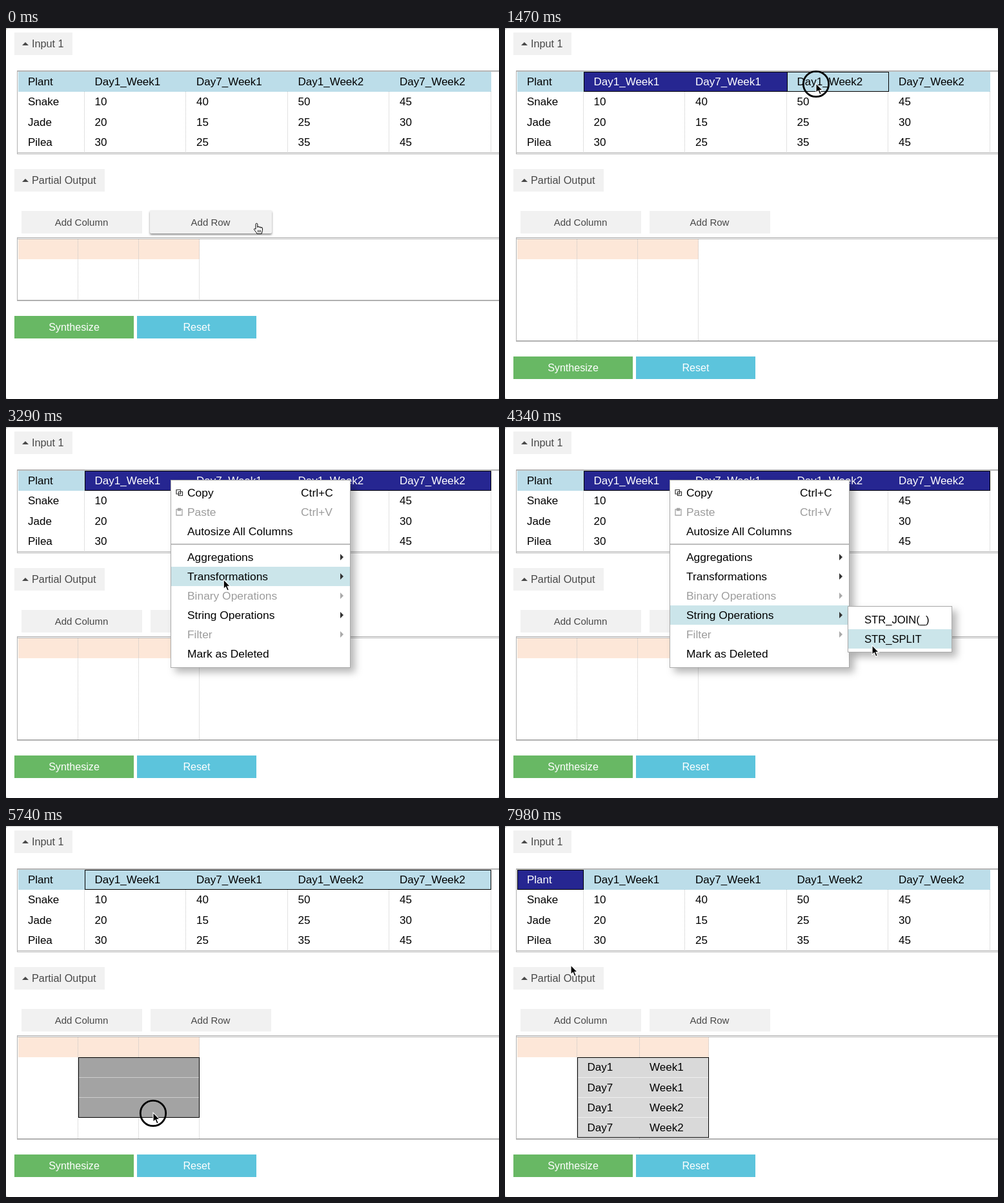
These frames come from a looping animation (764x576 px, 8000 ms). An HTML page:

```html
<!DOCTYPE html>
<html lang="en">
<head>
<meta charset="utf-8">
<title>Table synthesis</title>
<style>
html, body { margin: 0; width: 100%; height: 100%; overflow: hidden; background: #fff; }
svg { display: block; width: 764px; height: 576px; font: 17px "Liberation Sans", Arial, sans-serif; cursor: default; }
.menu { font-size: 17.4px; }
.sub { font-size: 16.6px; }
.raised { filter: drop-shadow(0 2px 1.5px rgba(0,0,0,.45)); }
.float { filter: drop-shadow(7px 7px 6px rgba(0,0,0,.28)); }
</style>
</head>
<body>
<svg id="stage" viewBox="0 0 764 576"></svg>
<script>
const LOOP = 8000, STEP = 70;

// Pointer tip: time, x, y
const PATH = [
  [0, 388, 304], [630, 388, 304], [1120, 165, 85], [1190, 165, 85],
  [1470, 482, 86], [1820, 738, 84], [2030, 738, 84], [2520, 259, 82],
  [2660, 255, 81], [2870, 255, 81], [3430, 365, 289], [3710, 368, 291],
  [3850, 380, 292], [4060, 543, 298], [4270, 569, 339], [4620, 569, 339],
  [5180, 140, 374], [5390, 140, 374], [5740, 228, 445], [6020, 252, 468],
  [6300, 252, 468], [6580, 199, 370], [7140, 73, 86], [7490, 73, 86],
  [7980, 102, 216], [8000, 102, 216]
];
// Intervals with a mouse button held
const PRESS = [[210, 350], [420, 560], [1190, 1960], [4410, 4550], [5250, 6160], [7210, 7490]];

const T = {
  row1: 280, row2: 490, select: 1190, menu: 2870, sub: 3850, shut: 4550,
  mark: 5250, paste: 6300, blur: 7350, plant: 7490
};

const HEAD = ["Plant", "Day1_Week1", "Day7_Week1", "Day1_Week2", "Day7_Week2"];
const DATA = [["Snake", 10, 40, 50, 45], ["Jade", 20, 15, 25, 30], ["Pilea", 30, 25, 35, 45]];
const EDGE = [19, 122, 279.5, 437, 594.5, 752];
const ROW = 31.25, TOP = 359;
const NAVY = "#262691", SKY = "#bcdde9", INK = "#000";

const MENU = [
  [102, "Copy"], [132, "Paste", 1], [162, "Autosize All Columns"],
  [202, "Aggregations"], [232, "Transformations"], [262, "Binary Operations", 1],
  [292, "String Operations"], [322, "Filter", 1], [352, "Mark as Deleted"]
];
const SUB = [[299, "STR_JOIN(_)"], [329, "STR_SPLIT"]];

const rect = (x, y, w, h, fill, more = "") =>
  `<rect x="${x}" y="${y}" width="${w}" height="${h}" fill="${fill}" ${more}/>`;
const frame = (x, y, w, h, color = INK) =>
  rect(x + .5, y + .5, w - 1, h - 1, "none", `stroke="${color}"`);
const text = (x, y, s, fill = INK, more = "") =>
  `<text x="${x}" y="${y}" fill="${fill}" ${more}>${s}</text>`;
const path = (d, fill, more = "") => `<path d="${d}" fill="${fill}" ${more}/>`;
const dots = (x, y, end) => path(`M${Math.floor(x) + .5} ${y}V${end}`, "none",
  `stroke="#c4c4c4" stroke-dasharray="1 1"`);
const within = (p, x, y, w, h) => p.x >= x && p.x < x + w && p.y >= y && p.y < y + h;
const clamp = (v, lo, hi) => Math.max(lo, Math.min(hi, v));

// Smooth curve through the path points, at rest wherever a point repeats
function slope(i, k) {
  const a = PATH[i - 1], b = PATH[i], c = PATH[i + 1];
  if (!a || !c) return 0;
  const d1 = b[k] - a[k], d2 = c[k] - b[k];
  return d1 * d2 <= 0 ? 0 : (c[k] - a[k]) / (c[0] - a[0]);
}
function pointer(t) {
  let i = 0;
  while (i < PATH.length - 2 && t >= PATH[i + 1][0]) i++;
  const a = PATH[i], b = PATH[i + 1], d = b[0] - a[0], u = (t - a[0]) / d;
  const at = k => {
    const s = u * u * (3 - 2 * u);
    return a[k] + (b[k] - a[k]) * s
      + d * u * (1 - u) * ((1 - u) * slope(i, k) - u * slope(i + 1, k));
  };
  return { x: at(1), y: at(2) };
}

function button(p, x, y, w, label, size, toggle) {
  const hot = p && within(p, x, y, w, 35);
  const box = hot ? rect(x - 1, y - 1, w + 2, 36, "#f1f1f1", `rx="2" class="raised"`)
                  : rect(x, y, w, 35, "#f1f1f1");
  const ink = "#484848";
  return box + (toggle
    ? path(`M${x + 12} ${y + 20}l5-5 5 5z`, ink) + text(x + 27, y + 23, label, ink, `font-size="${size}"`)
    : text(x + w / 2 - .5, y + 23, label, ink, `font-size="${size}" text-anchor="middle"`));
}

function headerRange(t) {
  const col = time => {
    const x = pointer(Math.min(time, 1820)).x;
    return clamp(EDGE.findIndex(e => e > x) - 1, 1, 4);
  };
  if (t < T.select || (t >= T.blur && t < T.plant)) return null;
  if (t >= T.plant) return { from: 0, to: 0, fill: 0 };
  return { from: 1, to: col(t), fill: t < T.mark ? col(t - STEP) : -1 };
}

function inputTable(t) {
  const range = headerRange(t);
  let s = rect(17, 66, 747, 1, "#a2a2a2") + rect(17, 67, 747, 1, "#c6c6c6")
    + rect(17, 66, 1, 130, "#b0b0b0")
    + rect(17, 193, 747, 1, "#b4b4b4") + rect(17, 195, 747, 1, "#b4b4b4")
    + rect(19, 68, 733, 31, SKY);
  if (range) {
    const x = EDGE[range.from];
    if (range.fill >= range.from) s += rect(x, 68, EDGE[range.fill + 1] - x, 31, NAVY);
    s += frame(Math.floor(x), 68, Math.ceil(EDGE[range.to + 1]) - Math.floor(x), 31);
    if (range.fill >= 0 && range.fill < range.to)
      s += frame(Math.floor(EDGE[range.to]), 68, 158, 31);
  }
  HEAD.forEach((name, c) => {
    const x = EDGE[c] + (c ? 15.5 : 15);
    const lit = range && c >= range.from && c <= range.fill;
    s += text(x, 89, name, lit ? "#fff" : INK) + dots(EDGE[c + 1] - 1, 99, 192);
    DATA.forEach((row, r) => s += text(x, 120 + r * 31.5, row[c]));
  });
  return s;
}

function outputTable(t, p) {
  const extra = (t >= T.row1) + (t >= T.row2);
  const pasted = t >= T.paste;
  const bottom = 422 + extra * 31.5;
  const x = pasted ? [112, 209, 316] : [112, 206, 300];
  let s = rect(17, 325, 747, 1, "#a8a8a8") + rect(17, 327, 747, 1, "#b8b8b8")
    + rect(17, 325, 1, bottom - 323, "#b0b0b0")
    + rect(17, Math.floor(bottom), 747, 2, "#b0b0b0")
    + rect(19, 328, x[2] - 19, 31, "#fde7d8");
  x.forEach(e => s += dots(e - 1, 328, bottom));

  if (t >= T.mark) {
    const q = pointer(Math.min(t, 6020));
    const cols = q.x >= 206 ? 2 : 1;
    const rows = clamp(Math.ceil((q.y - TOP) / ROW), 1, 4);
    const w = x[cols] - x[0], h = Math.round(rows * ROW);
    s += rect(x[0], TOP, w, h, t < T.blur ? "#a3a3a3" : "#d9d9d9");
    for (let r = 1; r < rows; r++)
      s += rect(x[0], Math.floor(TOP + r * ROW), w, 1, t < T.blur ? "#cdcdcd" : "#efefef");
    s += frame(x[0], TOP, w, h);
  }
  if (pasted) for (let r = 0; r < 4; r++) {
    const y = 380.3 + r * ROW;
    s += text(127.5, y, r % 2 ? "Day7" : "Day1") + text(224, y, r < 2 ? "Week1" : "Week2");
  }
  const y = 447 + extra * 31.5;
  const action = (x, label, fill) => rect(x, y, 185, 35, fill)
    + text(x + 92.5, y + 23, label, "#fff", `font-size="16.1" text-anchor="middle"`);
  return s + action(13, "Synthesize", "#68b864") + action(203, "Reset", "#5cc4dc");
}

function menus(t, p) {
  if (t < T.menu || t >= T.shut) return "";
  const open = t >= T.sub, hot = "#cbe5ea";
  const inSub = open && p.x > 531;
  const over = y => Math.abs(p.y - y) < 15;
  let s = rect(255.5, 82.5, 278, 291, "#fff", `stroke="#a9a9a9" class="float"`)
    + rect(256, 181, 277, 2, "#bdbdbd");
  MENU.forEach(([y, label, off], i) => {
    const ink = off ? "#9c9c9c" : INK;
    if (open ? i === 6 : !off && over(y)) s += rect(256, y - 15, 277, 30, hot);
    s += text(281, y + 6, label, ink);
    if (i < 2) s += text(457, y + 6, "Ctrl+" + "CV"[i], ink);
    if (i > 2 && i < 8) s += path(`M518 ${y - 5}l5 5-5 5z`, off ? "#aaa" : "#333");
  });
  s += path("M264 97.5h6.5v6.5h-6.5zM267.5 100.5h6v6h-6z", "none", `stroke="#333" stroke-width="1.2"`)
    + path("M264 128h9v9h-9zM266.5 126.5h4v3h-4z", "none", `stroke="#a5a5a5" stroke-width="1.3"`);
  if (open) {
    s += `<g class="sub">` + rect(531.5, 278.5, 161, 71, "#fff", `stroke="#a9a9a9" class="float"`);
    SUB.forEach(([y, label]) => {
      if (inSub && over(y)) s += rect(532, y - 15, 160, 30, hot);
      s += text(557, y + 6, label);
    });
    s += "</g>";
  }
  return `<g class="menu">${s}</g>`;
}

function cursor(p, hand, down) {
  const ring = down
    ? `<circle cx="${p.x}" cy="${p.y + 1}" r="19.7" fill="none" stroke="#000" stroke-width="2.8"/>` : "";
  const shape = hand
    ? `<g transform="translate(${p.x - 5} ${p.y - 1.5})">` + path("M4 10V2.2a1.4 1.4 0 0 1 2.8 0V7a1.3 1.3 0 0 1 2.6 0v.6a1.3 1.3 0 0 1 2.6 0v.6a1.2 1.2 0 0 1 2.4 0V12c0 2-1.4 3-1.4 5H6c-.8-2.5-3-4-4.4-6.5-.7-1.4 1-2.2 2.4-.5z", "#fff", `stroke="#000"`)
      + path("M7.5 11v4M9.5 11v4M11.5 11v4", "none", `stroke="#000" stroke-width=".8"`)
    : `<g transform="translate(${p.x} ${p.y})">` + path("M0 0V14.5L3.3 11.5 5.7 17.2 8.2 16.1 5.9 10.6H10.3z", "#000", `stroke="#fff" stroke-width="1.1"`);
  return ring + shape + "</g>";
}

function scene(t) {
  const p = pointer(t);
  const free = t < T.menu || t >= T.shut ? p : null;
  const keys = [
    [13, 7, 90, "Input 1", 16.2, true], [13, 219, 140, "Partial Output", 16.3, true],
    [24, 284, 187, "Add Column", 15], [224, 284, 187, "Add Row", 15]
  ];
  const hand = free && keys.some(([x, y, w]) => within(p, x, y, w, 35));
  const down = PRESS.some(([a, b]) => t >= a && t < b);
  return rect(0, 0, 764, 576, "#ccc") + rect(0, 1, 764, 575, "#fff", `rx="4"`)
    + keys.map(k => button(free, ...k)).join("")
    + inputTable(t) + outputTable(t, p) + menus(t, p) + cursor(p, hand, down);
}

const stage = document.getElementById("stage");
let start, last = -1;
function tick(now) {
  start ??= now;
  const t = Math.floor((now - start) % LOOP / STEP) * STEP;
  if (t !== last) stage.innerHTML = scene(last = t);
  requestAnimationFrame(tick);
}
stage.innerHTML = scene(0);
requestAnimationFrame(tick);
</script>
</body>
</html>
```
